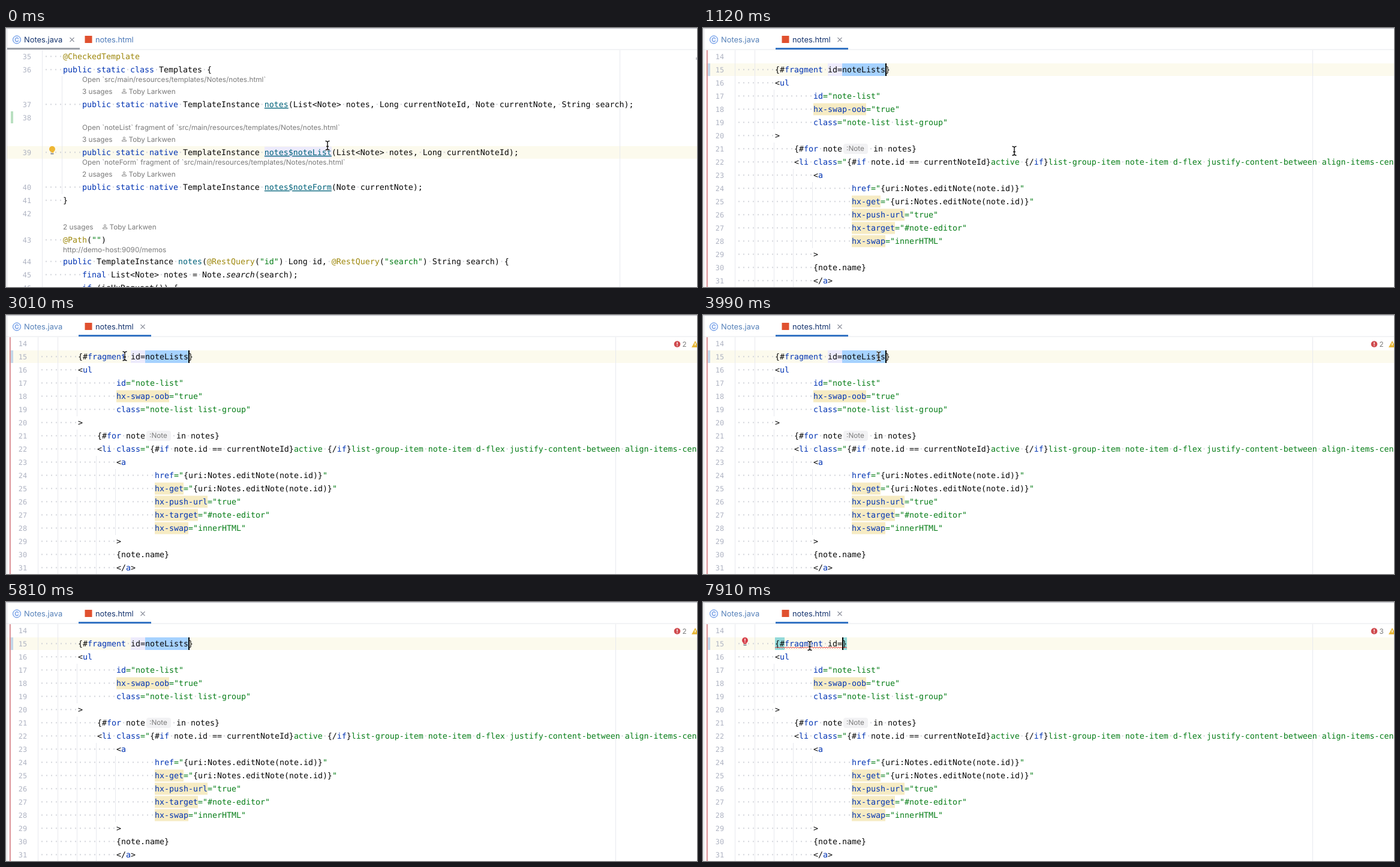
An HTML page for the animation above (8000 ms loop, 1152 by 432 pixels).

```html
<!DOCTYPE html>
<html lang="en">
<head>
<meta charset="utf-8">
<title>Code editor</title>
<style>
html, body { margin: 0; width: 100%; height: 100%; overflow: hidden; background: #fff; }
svg { display: block; width: 1152px; height: 432px; }
text { white-space: pre; text-rendering: geometricPrecision; }
.code { font: 13.29px "DejaVu Sans Mono", monospace; }
.num { font: 11.8px "DejaVu Sans Mono", monospace; fill: #aeb3c2; text-anchor: end; }
.ui { font: 11.75px Inter, sans-serif; fill: #7a7a7a; }
.tab { font: 12.9px Inter, sans-serif; }
.dots { fill: #c9ccd3; }
.k { fill: #080808; } .b { fill: #0033b3; } .g { fill: #067d17; } .a { fill: #9e880d; } .m { fill: #00627a; }
.i { fill: #080808; font-style: italic; }
.u { fill: #00627a; text-decoration: underline; }
.h { fill: var(--link); text-decoration: underline; }
</style>
</head>
<body>
<svg id="stage" viewBox="0 0 1152 432"></svg>
<script>
const stage = document.getElementById('stage');
const esc = s => String(s).replace(/&/g, '&amp;').replace(/</g, '&lt;');
const rect = (x, y, w, h, fill, extra = '') =>
  `<rect x="${x}" y="${y}" width="${w}" height="${h}" fill="${fill}" ${extra}/>`;
const text = (x, y, s, cls, extra = '') => `<text x="${x}" y="${y}" class="${cls}" ${extra}>${esc(s)}</text>`;
const group = (id, body) => `<g id="${id}">${body}</g>`;
const vline = (x, top, bottom, color = '#e8e9ee') => rect(x, top, 1, bottom - top, color);

// "^c" inside a source line switches to colour class c; spaces show as faint dots
function code(x0, cy, col, src) {
  const parts = ('^k' + src).split(/\^(.)/).slice(1);
  let plain = '', spans = '';
  for (let i = 0; i < parts.length; i += 2) {
    plain += parts[i + 1];
    spans += `<tspan class="${parts[i]}">${esc(parts[i + 1])}</tspan>`;
  }
  const dots = (' '.repeat(col) + plain).replace(/./g, c => c === ' ' ? '·' : ' ');
  return text(x0, cy + 4.5, dots, 'code dots') +
    `<text class="code" x="${x0 + col * 8}" y="${cy + 4.5}">${spans}</text>`;
}

function bulb(x, y, fill, mark) {
  return `<circle cx="${x}" cy="${y}" r="5" fill="${fill}"/>` + rect(x - 2.5, y + 4, 5, 2, fill) +
    rect(x - 2.5, y + 7, 5, 1.5, '#6c707e') + (mark ? rect(x - .7, y - 3, 1.4, 4, '#fff') + rect(x - .7, y + 2, 1.4, 1.4, '#fff') : '');
}

function usages(x, cy, n) {
  const px = x + 70;
  return text(x, cy + 4.3, n + ' usages', 'ui') + text(x + 77.5, cy + 4.3, 'Toby Larkwen', 'ui') +
    `<circle cx="${px}" cy="${cy - 2}" r="1.6" fill="none" stroke="#8a8a8a"/>` +
    `<path d="M${px - 3.5} ${cy + 3.5}v-1q0-1.5 2-1.5h3q2 0 2 1.5v1z" fill="none" stroke="#8a8a8a"/>`;
}

function javaEditor() {
  const page = '`src/main/resources/templates/Notes/notes.html`';
  const method = '^bpublic static native^k TemplateInstance ';
  const lines = [
    [35, 47.5, 4, '^a@CheckedTemplate'],
    [36, 69.5, 4, '^bpublic static class^k Templates {'],
    [37, 127.5, 8, method + '^unotes^k(List<Note> notes, Long currentNoteId, Note currentNote, String search);'],
    [38, 149.5, 0, ''],
    [39, 207.5, 8, method + '^hnotes$noteList^k(List<Note> notes, Long currentNoteId);'],
    [40, 265.5, 8, method + '^unotes$noteForm^k(Note currentNote);'],
    [41, 287.5, 4, '}'],
    [42, 309.5, 0, ''],
    [43, 353.5, 4, '^a@Path^k(^g""^k)'],
    [44, 389.5, 4, '^bpublic^k TemplateInstance ^mnotes^k(^a@RestQuery^k(^g"id"^k) Long id, ^a@RestQuery^k(^g"search"^k) String search) {'],
    [45, 411.5, 8, '^bfinal^k List<Note> notes = Note.^isearch^k(search);'],
    [46, 433.5, 8, '^bif^k (isHxRequest()) {']
  ];
  return rect(2, 197, 1150, 21, '#fcfaed') + rect(431, 198, 112, 19, '#edebfc') +
    vline(60, 37, 432) + vline(1023, 37, 432) + vline(93, 80, 277) +
    rect(8, 139, 4, 20, '#b9dfc0') + group('hintBulb', bulb(77, 202, '#eeb633')) + rect(1150, 49, 2, 4, '#c4c6cc') +
    lines.map(([n, y, col, s]) => text(42, y + 4.5, n, 'num') + code(63, y, col, s)).join('') +
    text(127, 90, 'Open ' + page, 'ui') + usages(127, 105.5, 3) +
    text(127, 170, 'Open `noteList` fragment of ' + page, 'ui') + usages(127, 185.5, 3) +
    text(127, 228, 'Open `noteForm` fragment of ' + page, 'ui') + usages(127, 243.5, 2) +
    usages(95, 331.5, 2) + text(95, 374, 'http://demo-host:9090/memos', 'ui');
}

function htmlEditor() {
  const edit = '="^k{uri:Notes.editNote(note.id)}^g"';
  const lines = [
    [0, ''],
    [8, '{#^bfragment^k id='],
    [8, '<^bul'],
    [16, '^bid^g="note-list"'],
    [16, '^bhx-swap-oob^g="true"'],
    [16, '^bclass^g="note-list list-group"'],
    [8, '>'],
    [12, '{#^bfor^k note'],
    [12, '<^bli class^g="^k{#^bif^k note.id == currentNoteId}^gactive ^k{/^bif^k}^glist-group-item note-item d-flex justify-content-between align-items-center'],
    [16, '<^ba'],
    [24, '^bhref^g' + edit],
    [24, '^bhx-get^g' + edit],
    [24, '^bhx-push-url^g="true"'],
    [24, '^bhx-target^g="#note-editor"'],
    [24, '^bhx-swap^g="innerHTML"'],
    [16, '>'],
    [16, '{note.name}'],
    [16, '</^ba^k>']
  ];
  const rowY = i => 47.5 + 22 * i;
  const marked = [[4, 184, 11], [11, 248, 6], [12, 248, 11], [13, 248, 9], [14, 248, 7]];
  const wave = 'M120 77' + 'l2 -2l2 2'.repeat(30);
  return rect(2, 59, 1150, 21, '#fcfaed') + rect(6, 37, 1.6, 395, '#d3767c') + rect(8, 59, 4, 21, '#c3d6e8') +
    vline(53, 37, 432) + vline(1016, 37, 432) + vline(86, 37, 432) +
    vline(118, 103, 169) + vline(118, 191, 432) + vline(150, 235, 432) + vline(182, 257, 367) +
    marked.map(([i, x, n]) => rect(x, rowY(i) - 10, n * 8, 20, '#f6ebc3')).join('') +
    group('selection', rect(208, 59, 24, 21, '#edebfc') + rect(232, 59, 72, 21, '#a6d2ff') + code(232, 69.5, 0, 'noteLists}')) +
    group('emptied', rect(120, 59, 16, 21, '#93d9d9') + rect(232, 59, 8, 21, '#93d9d9') + code(232, 69.5, 0, '}')) +
    lines.map(([col, s], i) => text(35, rowY(i) + 4.5, 14 + i, 'num') + code(56, rowY(i), col, s)).join('') +
    rect(234, 193, 41, 17, '#f2f2f4', 'rx="4"') + text(239, 205.3, ':Note', 'ui') + code(276, 201.5, 0, ' in notes}') +
    group('problems', `<path d="${wave}" fill="none" stroke="#e53935"/>` + bulb(70, 64, '#d6404b', true)) +
    group('status', `<circle cx="1119" cy="48.5" r="5.3" fill="#cf4a4e"/>` + rect(1118.3, 45.3, 1.4, 4, '#fff') +
      rect(1118.3, 50.3, 1.4, 1.4, '#fff') + `<text id="errors" class="ui" x="1127.5" y="53"></text>` +
      `<path d="M1149 43l6 11h-12z" fill="#e9b93a"/>` + rect(1148.3, 47, 1.4, 3.5, '#fff')) +
    rect(0, 59, 2, 21, '#000', 'id="caret"');
}

const cross = x => `<path d="M${x - 3.5} 16l7 7m0 -7l-7 7" stroke="#8c909c" stroke-width="1.1"/>`;
const beam = 'M-3.5 -7.5q3 0 3.5 2q.5 -2 3.5 -2M0 -6V6M-3.5 7.5q3 0 3.5 -2q.5 2 3.5 2M-2 1.5h4';

stage.innerHTML = rect(0, 0, 1152, 432, '#fff') +
  group('java', javaEditor()) + group('html', htmlEditor()) +
  rect(0, 0, 1152, 37, '#fff') + rect(0, 0, 1152, 1.3, '#c2c4ca') + rect(0, 35.5, 1152, 1, '#e6e7eb') + rect(1, 0, 1, 432, '#d3d5db') +
  `<circle cx="18" cy="19.5" r="6.5" fill="#edf3ff" stroke="#4a83e0"/>` +
  text(18, 23, 'C', 'ui', 'text-anchor="middle" style="fill:#3d76d6;font-size:9.5px"') +
  rect(131.5, 13, 12, 12, '#e0502f') +
  text(30, 24, 'Notes.java', 'tab', 'id="javaTab"') + text(149, 24, 'notes.html', 'tab', 'id="htmlTab"') +
  group('javaCross', cross(110)) + group('htmlCross', cross(228)) +
  rect(2, 33, 121, 3, '#3574c4', 'id="underline"') +
  group('pointer', `<path d="${beam}" fill="none" stroke="#fff" stroke-width="3"/><path d="${beam}" fill="none" stroke="#111" stroke-width="1.4"/>`);

const el = {};
stage.querySelectorAll('[id]').forEach(e => el[e.id] = e);
const show = (id, on) => el[id].setAttribute('display', on ? 'inline' : 'none');

// time, x, y
const path = [
  [210, 536, 196], [980, 519, 205], [1960, 519, 205], [2240, 322, 98], [2450, 322, 98],
  [3010, 198, 68.5], [3290, 198, 68.5], [3500, 293, 69], [4410, 293, 69], [4690, 219, 70],
  [5040, 219, 70], [5390, 374, 88], [6510, 374, 88], [7280, 178, 73]
];
const caretOn = [[1050, 1540], [2660, 3150], [3640, 4130], [4620, 5110], [5390, 6510], [7000, 7490], [7840, 8000]];

function pointerAt(t) {
  const i = path.findIndex(p => p[0] > t);
  if (i === 0) return path[0].slice(1);
  if (i < 0) return path[path.length - 1].slice(1);
  const [t0, x0, y0] = path[i - 1], [t1, x1, y1] = path[i];
  const u = (t - t0) / (t1 - t0), e = u * u * (3 - 2 * u);
  return [x0 + (x1 - x0) * e, y0 + (y1 - y0) * e];
}

function draw(now) {
  const t = Math.floor(now % 8000 / 70) * 70;
  const html = t >= 1050, deleted = t >= 5880, checked = t >= 6510;
  show('java', !html);
  show('html', html);
  show('javaCross', !html);
  show('htmlCross', html);
  show('hintBulb', t < 70);
  el.javaTab.setAttribute('fill', html ? '#5580b8' : '#14336e');
  el.htmlTab.setAttribute('fill', html ? '#14336e' : '#4a78b8');
  el.underline.setAttribute('x', html ? 121 : 2);
  el.underline.setAttribute('fill', t < 70 ? '#9da1a9' : '#3574c4');
  stage.style.setProperty('--link', t < 910 ? '#00627a' : '#2a6fc9');
  show('selection', !deleted);
  show('emptied', deleted);
  show('problems', checked);
  show('status', t >= 1400);
  el.errors.textContent = checked ? 3 : 2;
  show('caret', caretOn.some(([a, b]) => t >= a && t < b));
  el.caret.setAttribute('x', deleted ? 232 : 304);
  show('pointer', t < 5810 || checked);
  el.pointer.setAttribute('transform', `translate(${pointerAt(t)})`);
}

const start = performance.now();
function tick() {
  draw(performance.now() - start);
  requestAnimationFrame(tick);
}
tick();
</script>
</body>
</html>
```
